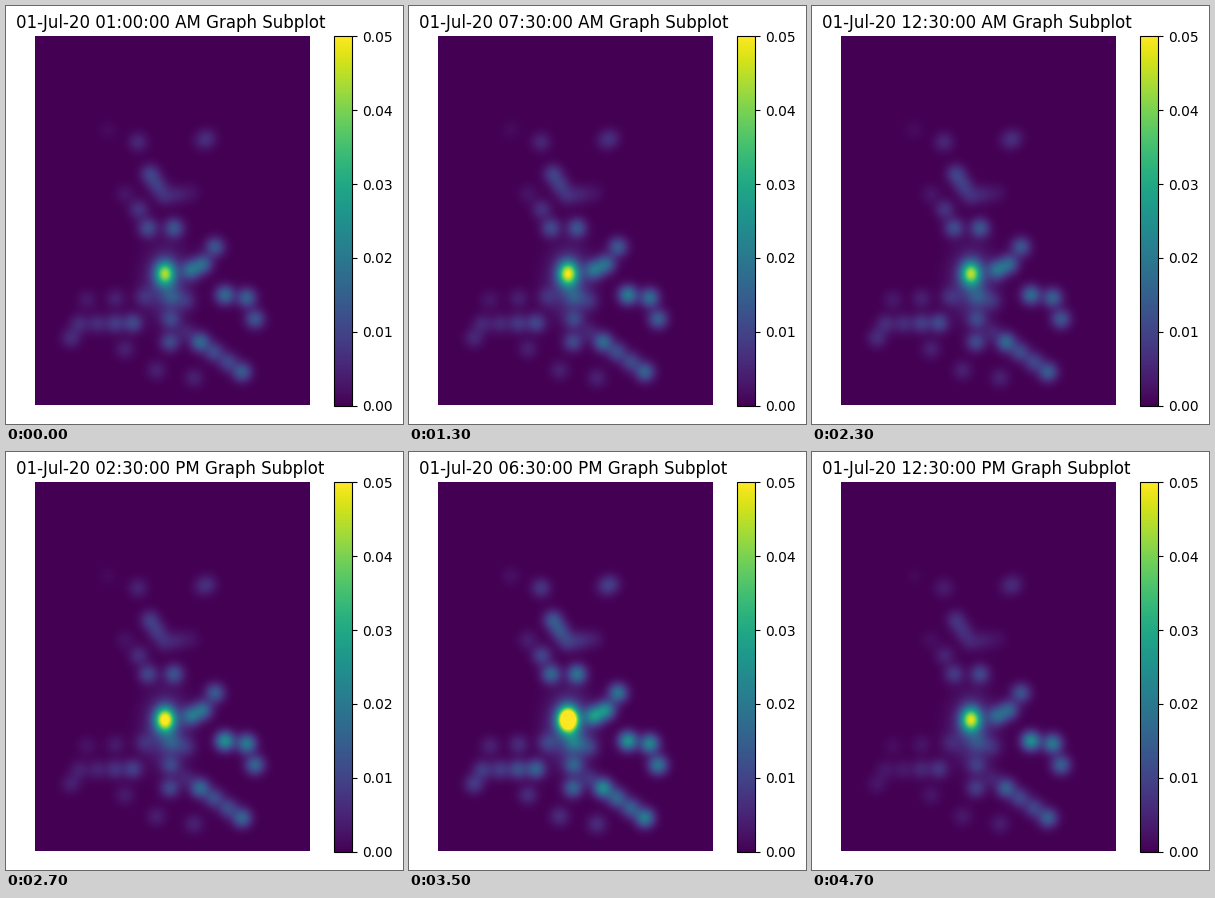
A matplotlib script that plays this animation: 397 px wide and 418 px high, repeating every 4.8 s.

```python
import numpy as np
import matplotlib.pyplot as plt
from matplotlib.animation import FuncAnimation

W, H, DPI = 397, 418, 100
LEFT, TOP, MAP_W, MAP_H = 29, 30, 275, 369
BAR_H = 369.6
FRAMES, INTERVAL = 48, 100
SPOT = 6.7

plt.rcParams["font.family"] = "DejaVu Sans"
plt.rcParams["text.kerning_factor"] = 6

# Each road: number of hot spots, levels along it (thousandths), bends.
ROADS = [
    (5, [5.5, 5.5, 10], [(65, 332), (71, 318), (127, 317)]),
    (3, [3, 5], [(81, 294), (138, 291)]),
    (3, [10.5, 2.5], [(142, 222), (132, 202), (119, 188)]),
    (5, [8.5, 2], [(144, 168), (158, 190), (185, 187)]),
    (2, [1.3, 5], [(102, 124), (132, 136)]),
    (2, [3, 4], [(196, 135), (202, 132)]),
    (2, [12, 12], [(168, 222), (209, 241)]),
    (2, [15, 14], [(185, 264), (197, 258)]),
    (3, [15.5, 12], [(219, 289), (240, 290), (249, 313)]),
    (4, [15, 7, 13], [(194, 336), (236, 366)]),
    (3, [10, 7], [(164, 336), (166, 291)]),
    (3, [4, 4], [(119, 343), (149, 364), (188, 372)]),
    (2, [4, 5], [(180, 326), (180, 295)]),
]

gx, gy = np.meshgrid(LEFT + np.arange(MAP_W) + 0.5, TOP + np.arange(MAP_H) + 0.5)


def blob(x, y, level, sx=SPOT, sy=SPOT):
    return level / 1000 * np.exp(-((gx - x) / sx) ** 2 / 2 - ((gy - y) / sy) ** 2 / 2)


def spots(n, levels, bends):
    """Spread n spots evenly along the road."""
    xs, ys = np.array(bends, float).T
    dist = np.append(0, np.cumsum(np.hypot(np.diff(xs), np.diff(ys))))
    t = np.linspace(0, 1, n)
    at = t * dist[-1]
    return zip(np.interp(at, dist, xs), np.interp(at, dist, ys),
               np.interp(t, np.linspace(0, 1, len(levels)), levels))


def day_factor(x, y):
    """Quiet homes in the west, a busy hub in the east."""
    hub = np.exp(-((x - 221) ** 2 + (y - 289) ** 2) / 700)
    return 0.45 + (x - 60) / 300 + 0.5 * hub


SPOTS = [s for road in ROADS for s in spots(*road)]
HALO = blob(160, 276, 9, 14, 22)
CORE = blob(159, 267.5, 33, 7, 8.5)
NIGHT = HALO + sum(blob(*s) for s in SPOTS)
DAY = HALO + sum(blob(x, y, v * day_factor(x, y)) for x, y, v in SPOTS)


def bump(hour, centre, width):
    gap = (hour - centre + 12) % 24 - 12
    return np.exp(-(gap / width) ** 2)


def field(hour):
    load = 1 + 0.52 * bump(hour, 18.7, 3.8) + 0.14 * bump(hour, 6, 3)
    day = bump(hour, 12, 4.2)
    return load * (NIGHT + day * (DAY - NIGHT)) + load ** 1.7 * (1 + 0.13 * day) * CORE


def clock(i):
    """Labels run 01:00 to 12:30 in each half, so twelve comes last."""
    half, step = divmod(i, 24)
    h, m = 1 + step // 2, 30 * (step % 2)
    label = f"01-Jul-20 {h:02d}:{m:02d}:00 {'AP'[half]}M Graph Subplot"
    return label, h % 12 + m / 60 + 12 * half


def px_axes(x, y, w, h):
    return fig.add_axes([x / W, 1 - (y + h) / H, w / W, h / H])


fig = plt.figure(figsize=(W / DPI, H / DPI), dpi=DPI, facecolor="white")
ax = px_axes(LEFT, TOP, MAP_W, MAP_H)
ax.axis("off")
im = ax.imshow(NIGHT, cmap="viridis", vmin=0, vmax=0.05,
               interpolation="nearest", aspect="auto")
fig.colorbar(im, cax=px_axes(327.8, TOP + 0.2, BAR_H / 20, BAR_H))
title = fig.text(10 / W, 1 - 22 / H, "", fontsize=12, va="baseline")


def update(i):
    label, hour = clock(i)
    title.set_text(label)
    im.set_data(field(hour))
    return im, title


anim = FuncAnimation(fig, update, frames=FRAMES, interval=INTERVAL,
                     repeat=True, repeat_delay=0)
plt.show()
```
